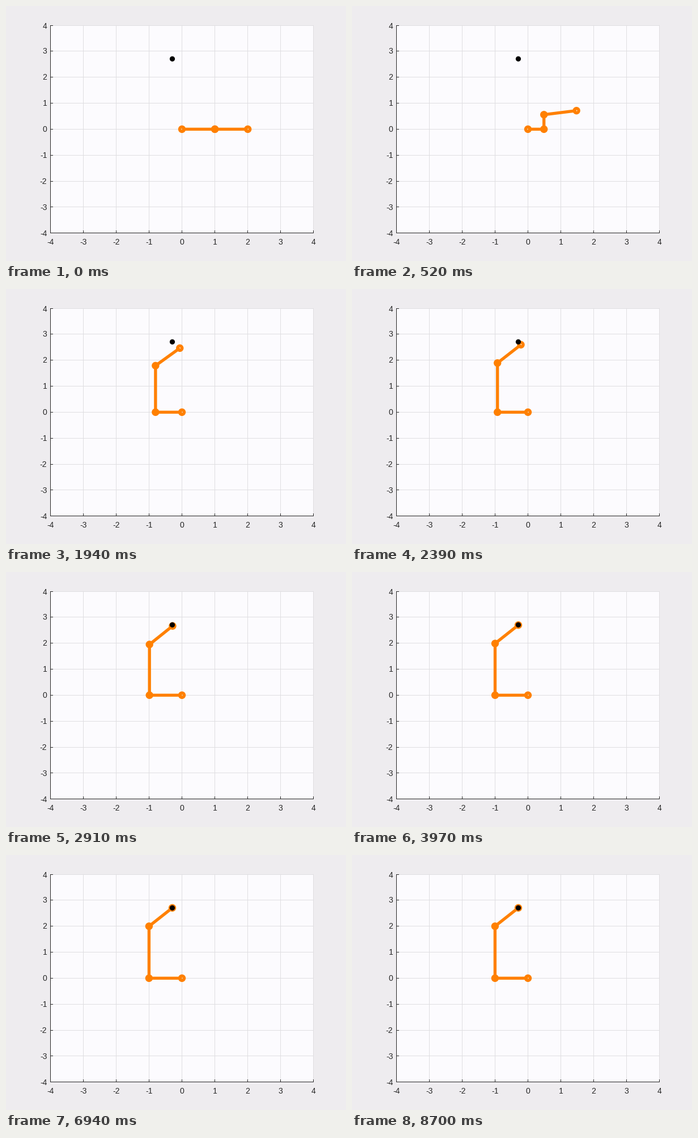
Animation, 600 px wide and 450 px high, one loop 10 s. Source, as a matplotlib script:

```python
import numpy as np
import matplotlib.pyplot as plt
from matplotlib.animation import FuncAnimation
from matplotlib.patches import Circle, Rectangle

W, H = 600, 450
FRAMES, INTERVAL = 400, 25
ORIGIN = np.array([310.5, 217.4])
UNIT = np.array([58.1, -45.84])
START = np.array([1.0, 0.0, 0.0])
GOAL = np.array([-1.0, 2.0, np.pi / 4])
ORANGE, INK = "#ff8000", "#262626"
LINK_WIDTH = 5.33

plt.rcParams["font.family"] = "Liberation Sans"
fig = plt.figure(figsize=(W / 72, H / 72), dpi=72, facecolor="#eeecef")
ax = fig.add_axes([0, 0, 1, 1])
ax.set(xlim=(0, W), ylim=(H, 0))
ax.axis("off")


def to_px(points):
    return ORIGIN + np.asarray(points) * UNIT


def pixel_center(value):
    return np.floor(value) + 0.5


def stroke(x, y, color, z):
    ax.plot(x, y, color=color, lw=1, zorder=z, snap=False,
            solid_capstyle="projecting")


def draw_axes():
    left, bottom = pixel_center(to_px([-4, -4]))
    right, top = pixel_center(to_px([4, 4]))
    ax.add_patch(Rectangle((left, top), right - left, bottom - top,
                           fc="#fcfbfe", ec="none", zorder=0))
    for v in range(-4, 5):
        x, y = pixel_center(to_px([v, v]))
        stroke([x, x], [top, bottom], "#dfdee1", 1)
        stroke([left, right], [y, y], "#dfdee1", 1)
        stroke([x, x], [bottom, bottom - 4], INK, 2)
        stroke([left, left + 4], [y, y], INK, 2)
        ax.text(x, 421.3, str(v), size=14, color=INK, ha="center", va="baseline")
        ax.text(72.3, y + 5, str(v), size=14, color=INK, ha="right", va="baseline")
    stroke([left, left], [top, bottom], INK, 2)
    stroke([left, right], [bottom, bottom], INK, 2)


def remaining(t):
    """Fraction of the way still to go for slide, lift and wrist."""
    overshoot = np.exp(-(t - 2.6) ** 2)
    s, w = 1.96 * t, 3.05 * t
    slide = (1 + s) * np.exp(-s) - 0.0175 * overshoot
    lift = (2.9 * np.exp(-1.55 * t) - 1.55 * np.exp(-2.9 * t)) / 1.35
    wrist = (1 + w + w * w / 2) * np.exp(-w) - 0.018 * overshoot
    return np.array([slide, lift, wrist])


def arm_points(t):
    x, y, angle = GOAL + (START - GOAL) * remaining(t)
    tip = (x + np.cos(angle), y + np.sin(angle))
    return to_px([(0, 0), (x, 0), (x, y), tip])


draw_axes()
arm, = ax.plot([], [], color=ORANGE, lw=LINK_WIDTH, zorder=4, snap=False,
               solid_capstyle="butt", solid_joinstyle="round")
joints = [ax.add_patch(Circle((0, 0), 4, fill=False, ec=ORANGE,
                              lw=LINK_WIDTH, zorder=5)) for _ in range(4)]
target = to_px([GOAL[0] + np.cos(GOAL[2]), GOAL[1] + np.sin(GOAL[2])])
ax.add_patch(Circle(target, 4.6, fc="black", ec="none", zorder=6))


def update(frame):
    points = arm_points(frame * INTERVAL / 1000)
    arm.set_data(points[:, 0], points[:, 1])
    for joint, point in zip(joints, points):
        joint.center = point
    return [arm, *joints]


anim = FuncAnimation(fig, update, frames=FRAMES, interval=INTERVAL,
                     repeat=True, repeat_delay=0)
plt.show()
```
